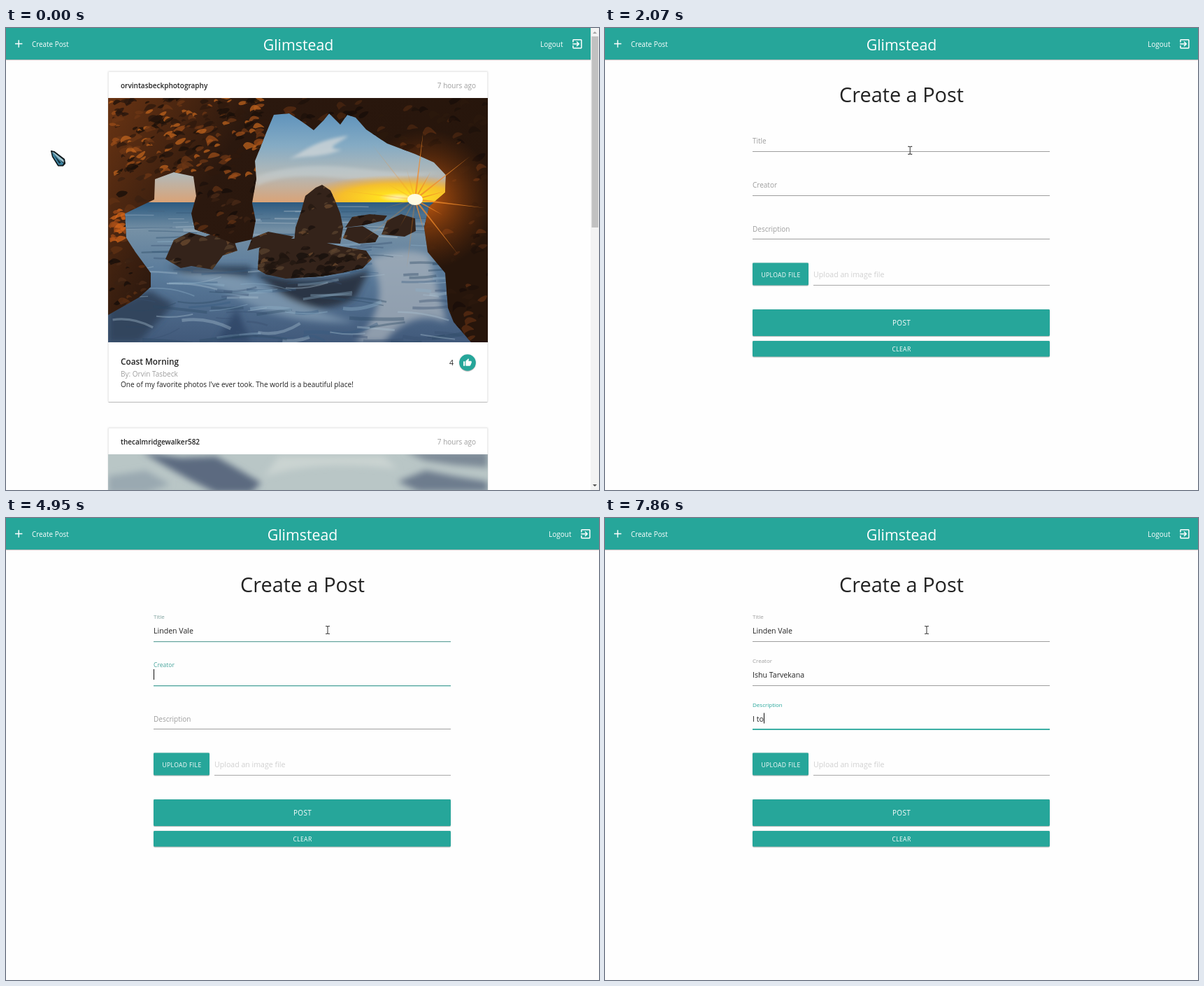
Recreate the animation shown at these times as an HTML page. Size 848x660 px, loop 7990 ms.

```html
<!DOCTYPE html>
<html lang="en">
<head>
<meta charset="utf-8">
<title>Photo feed</title>
<style>
html, body { margin: 0; width: 100%; height: 100%; overflow: hidden; background: #fefefe; }
svg { display: block; width: 848px; height: 660px; }
text { font: 10px "Open Sans", "Noto Sans", sans-serif; fill: #222; white-space: pre; }
.white { fill: #fff; }
.grey { fill: #9e9e9e; }
.bold { font-weight: 600; }
.teal { fill: #26a69a; }
.btn { letter-spacing: .35px; text-anchor: middle; fill: #fff; }
.small { font-size: 8.6px; }
.field { font-size: 10.6px; }
.lift { filter: drop-shadow(0 1.4px .7px rgba(0,0,0,.22)) drop-shadow(0 .5px 1px rgba(0,0,0,.14)); }
.light { fill: #9cc3cf; }
.mid { fill: #3f86a3; }
.deep { fill: #16303d; }
.link .light { fill: #e6edc4; }
.link .mid { fill: #4cbf52; }
.link .deep { fill: #1d7a33; }
</style>
</head>
<body>
<svg viewBox="0 0 848 660" id="stage">
  <defs>
    <linearGradient id="sky" x1="0" y1="0" x2="0" y2="1">
      <stop offset="0" stop-color="#4d88b8"/>
      <stop offset=".45" stop-color="#85abc4"/>
      <stop offset=".72" stop-color="#b3b9b8"/>
      <stop offset="1" stop-color="#dba274"/>
    </linearGradient>
    <linearGradient id="sea" x1="0" y1="0" x2="0" y2="1">
      <stop offset="0" stop-color="#2c5a80"/>
      <stop offset=".2" stop-color="#7590a5"/>
      <stop offset=".5" stop-color="#5a7b9b"/>
      <stop offset="1" stop-color="#41597a"/>
    </linearGradient>
    <radialGradient id="glow">
      <stop offset="0" stop-color="#fff8c0"/>
      <stop offset=".2" stop-color="#ffdf20"/>
      <stop offset=".6" stop-color="#fdc21a" stop-opacity=".85"/>
      <stop offset="1" stop-color="#f5a02c" stop-opacity="0"/>
    </radialGradient>
    <linearGradient id="stone" x1="0" y1="0" x2="1" y2=".35">
      <stop offset="0" stop-color="#6a3413"/>
      <stop offset=".35" stop-color="#2b180e"/>
      <stop offset="1" stop-color="#26150b"/>
    </linearGradient>
    <radialGradient id="flare" gradientUnits="userSpaceOnUse" cx="600" cy="245" r="100">
      <stop offset="0" stop-color="#e0660f" stop-opacity=".85"/>
      <stop offset="1" stop-color="#8a3c0c" stop-opacity="0"/>
    </radialGradient>
    <filter id="soft" x="-30%" y="-50%" width="160%" height="200%"><feGaussianBlur stdDeviation="5"/></filter>
    <filter id="haze" x="-10%" y="-20%" width="120%" height="140%"><feGaussianBlur stdDeviation="2"/></filter>
    <clipPath id="frame"><rect x="146" y="100" width="543" height="349"/></clipPath>
    <clipPath id="strip"><rect x="146" y="609" width="543" height="51"/></clipPath>
    <clipPath id="cliff"><path id="arch" d="M146 100H689V449H665L640 420 632 400 628 350 603 320 598 285 605 255 628 235 629 210 612 192 585 180 545 165 515 145 500 128 488 124 478 138 462 122 454 132 440 146 425 135 405 122 383 124 372 150 356 190 358 215 352 250 357 275 352 302 325 308 295 296 270 288 265 265 272 240 268 212 240 206 213 216 212 245 170 265 172 300 185 320 207 350 207 370 190 385 146 410Z"/></clipPath>
    <clipPath id="boulders"><path id="rocks" d="M412 305L414 285 422 262 428 240 443 228 452 224 464 232 470 245 478 265 482 285 478 308Z
      M360 345L362 315 375 303 400 300 440 303 480 312 515 318 523 330 510 343 480 350 450 355 400 358 372 352Z
      M228 330L240 303 262 292 285 298 300 292 325 300 331 318 310 325 295 345 265 340 250 343Z
      M482 300L488 285 510 283 533 297 528 306 505 308Z M537 295L545 275 565 266 585 272 586 290 570 298Z
      M485 285L495 270 520 266 545 268 540 275 510 282Z M345 318L352 300 375 291 412 298 400 306 368 312Z"/></clipPath>
  </defs>
  <rect width="848" height="660" fill="#fefefe"/>

  <g id="feed">
    <rect class="lift" x="146" y="62" width="543" height="472" rx="1.4" fill="#fff"/>
    <path d="M146.5 534V62.5H688.5V534" fill="none" stroke="#ececec"/>
    <text class="bold" x="164" y="86">orvintasbeckphotography</text>
    <text class="grey" x="672" y="86" text-anchor="end">7 hours ago</text>
    <g clip-path="url(#frame)">
      <rect x="146" y="100" width="543" height="151" fill="url(#sky)"/>
      <g fill="#cdd5d8" filter="url(#haze)">
        <path d="M405 187C425 178 440 160 490 154C470 168 455 172 480 174C450 186 425 182 405 187Z" opacity=".8"/>
        <path d="M358 212Q420 190 500 200T620 206Q540 222 470 214T358 226Z" opacity=".45"/>
      </g>
      <ellipse cx="560" cy="242" rx="135" ry="32" fill="url(#glow)"/>
      <rect x="146" y="249" width="543" height="200" fill="url(#sea)"/>
      <g filter="url(#soft)">
        <path d="M350 345Q430 375 520 345L500 385Q450 415 400 385Z" fill="#2c3644"/>
        <path d="M146 400L205 375 240 395 190 449H146Z" fill="#31445d"/>
        <path d="M230 340H350V355L260 352Z" fill="#33445a"/>
        <path d="M330 400L350 449H300Z" fill="#33496a"/>
        <path d="M520 330Q570 310 605 325L630 420Q580 400 540 449H500Q555 390 520 330Z" fill="#a9b2bd" opacity=".75"/>
        <path d="M215 360Q300 335 370 370T500 420Q400 425 330 385T215 360Z" fill="#93aabf" opacity=".6"/>
      </g>
      <g id="waves"></g>
      <use href="#rocks" fill="#34231a"/>
      <g id="facets" clip-path="url(#boulders)"></g>
      <use href="#arch" fill="url(#stone)"/>
      <g id="grain" clip-path="url(#cliff)"></g>
      <use href="#arch" fill="url(#flare)"/>
      <g id="rays" fill="#f08a2a"></g>
      <ellipse cx="585" cy="245" rx="11" ry="8" fill="#fffbe0"/>
    </g>
    <text class="bold" x="164" y="481" style="font-size:11.8px">Coast Morning</text>
    <text class="grey" x="164" y="498">By: Orvin Tasbeck</text>
    <text x="164" y="513" style="font-size:10.08px">One of my favorite photos I've ever took. The world is a beautiful place!</text>
    <text x="634" y="482" style="font-size:10.6px">4</text>
    <circle class="teal lift" cx="660" cy="478" r="11.8"/>
    <path class="white" transform="translate(653.6 471.6) scale(.53)" d="M1 21h4V9H1v12zm22-11c0-1.1-.9-2-2-2h-6.31l.95-4.57.03-.32c0-.41-.17-.79-.44-1.06L14.17 1 7.59 7.59C7.22 7.95 7 8.45 7 9v10c0 1.1.9 2 2 2h9c.83 0 1.54-.5 1.84-1.22l3.02-7.05c.09-.23.14-.47.14-.73v-2z"/>

    <rect class="lift" x="146" y="571" width="543" height="100" rx="1.4" fill="#fff"/>
    <path d="M146.5 660V571.5H688.5V660" fill="none" stroke="#ececec"/>
    <text class="bold" x="164" y="595">thecalmridgewalker582</text>
    <text class="grey" x="672" y="595" text-anchor="end">7 hours ago</text>
    <g clip-path="url(#strip)">
      <rect x="146" y="609" width="543" height="51" fill="#b9c6c6"/>
      <g filter="url(#soft)" fill="#5b6a80">
        <path d="M195 606L250 614 300 612 335 632 365 650 350 664H300L262 645 232 628Z"/>
        <path d="M560 648L600 632 640 640 689 648V662H590Z" fill="#6d7b8d"/>
        <path d="M570 605H689V628L640 624 600 618Z" fill="#7c8996"/>
        <path d="M370 640Q450 615 560 630L540 612H390Z" fill="#cbd4d2"/>
        <path d="M146 640L200 632 235 652 200 664H146Z" fill="#9aa9b1"/>
      </g>
    </g>
    <rect x="836" width="12" height="660" fill="#f3f3f3"/>
    <rect x="837.5" y="12" width="9.5" height="273" fill="#c1c1c1"/>
    <path d="M839 8L842 5 845 8Z" fill="#a3a3a3"/>
    <path d="M839 652L842 655 845 652Z" fill="#505050"/>
  </g>

  <g id="form">
    <text x="424" y="106" text-anchor="middle" style="font-size:28.9px">Create a Post</text>
    <g id="fields"></g>
    <rect class="teal lift" x="211" y="335.5" width="80" height="32" rx="1.4"/>
    <text class="btn small" x="251.5" y="355.5">UPLOAD FILE</text>
    <text class="field" x="298" y="356" style="fill:#d0d0d0">Upload an image file</text>
    <rect x="298" y="367" width="338" height="1" fill="#a8a8a8"/>
    <rect class="teal lift" x="211" y="402" width="425" height="38" rx="1.4"/>
    <text class="btn" x="424" y="425">POST</text>
    <rect class="teal lift" x="211" y="447" width="425" height="22.5" rx="1.4"/>
    <text class="btn small" x="424" y="462">CLEAR</text>
  </g>

  <rect id="bar" class="teal lift" width="848" height="45"/>
  <rect id="hover" width="101" height="45"/>
  <path d="M13 22.5H23.4M18.2 17.3V27.7" stroke="#fff" stroke-width="1.4"/>
  <text class="white" x="37" y="27" style="font-size:9.9px">Create Post</text>
  <text class="white" id="brand" y="32" text-anchor="middle" style="font-size:21.3px">Glimstead</text>
  <g id="logout">
    <text class="white" x="764" y="27">Logout</text>
    <path class="white" transform="translate(807.9 13.8) scale(.75)" d="M10.09 15.59L11.5 17l5-5-5-5-1.41 1.41L12.67 11H3v2h9.67l-2.58 2.59zM19 3H5c-1.11 0-2 .9-2 2v4h2V5h14v14H5v-4H3v4c0 1.1.89 2 2 2h14c1.1 0 2-.9 2-2V5c0-1.1-.9-2-2-2z"/>
  </g>

  <g id="status">
    <path d="M0 660V645.5H75.5Q78.5 645.5 78.5 648.5V660Z" fill="#38383c"/>
    <text x="3" y="656" style="font-size:8.1px;fill:#d8d8dc">localhost:3000/add</text>
  </g>

  <g id="arrow" stroke-linejoin="round">
    <path d="M.6 .6L5 1.6 19.5 12.5 20.5 18.5 17.5 21.8 10.5 21.8 2.5 9Z" fill="#0c1519" stroke="#0c1519" stroke-width="1.2"/>
    <path class="mid" d="M1.6 2L18.4 18.6 16.8 20.6 11.2 20.8 3.4 8.4Z"/>
    <path class="light" d="M1.6 1.8L5 3 18.4 13.4 19 17.6 12 12.4Z"/>
    <path class="deep" d="M5.2 7L14.8 17.6 12 18.8Z"/>
  </g>
  <path id="beam" d="M-3-5.5H-1L0-4.5 1-5.5H3M-3 5.5H-1L0 4.5 1 5.5H3M0-4.5V4.5" fill="none" stroke="#444" stroke-width="1.1"/>
</svg>
<script>
const LOOP = 7990, SWITCH = 1410, LEFT = 211;
const $ = id => document.getElementById(id);
const clamp = v => Math.max(0, Math.min(1, v));
const ramp = (t, from, to) => clamp((t - from) / (to - from));
const easeOut = p => 1 - (1 - p) ** 2;
const easeBoth = p => p * p * (3 - 2 * p);
const mix = (a, b, p) => a + (b - a) * p;
const blend = (a, b, p) => `rgb(${a.map((v, i) => Math.round(mix(v, b[i], p)))})`;
const set = (el, attrs) => { for (const k in attrs) el.setAttribute(k, attrs[k]); };
const show = (el, on) => { el.style.display = on ? '' : 'none'; };
function add(parent, tag, attrs) {
  const el = document.createElementNS('http://www.w3.org/2000/svg', tag);
  set(el, attrs);
  return parent.appendChild(el);
}

// Photo texture
let seed = 11;
const rnd = (a = 0, b = 1) => {
  seed = (seed * 1664525 + 1013904223) % 4294967296;
  return mix(a, b, seed / 4294967296);
};
const pick = list => list[Math.floor(rnd(0, list.length))];
function chips(id, n, [x0, y0, x1, y1], size, colors) {
  for (let i = 0; i < n; i++) {
    const x = rnd(x0, x1), y = rnd(y0, y1), s = rnd(size / 3, size);
    const d = `M${x} ${y}q${s * .3} ${-s * rnd(.4, 1)} ${s} ${-s * rnd(.2, .8)}t${s * rnd(0, .4)} ${s * .4}t${-s} ${s * rnd(.1, .6)}Z`;
    add($(id), 'path', { d, fill: pick(colors), opacity: .75 });
  }
}
function waves(n, y0, y1, long, colors) {
  for (let i = 0; i < n; i++) {
    const y = rnd(y0, y1), near = (y - 250) / 200, w = rnd(long / 4, long), bend = w * .12 * near;
    add($('waves'), 'path', {
      d: `M${rnd(140, 670)} ${y}q${w / 2} ${rnd(-bend, bend)} ${w} ${rnd(-bend, bend) * 2}`,
      fill: 'none', stroke: pick(colors), 'stroke-width': rnd(1, 2 + 4 * near), opacity: .38
    });
  }
}
waves(70, 255, 300, 90, ['#2a4c6c', '#c3ced6', '#9fb4c4', '#466580']);
waves(130, 300, 449, 80, ['#8fb0c9', '#2c4763', '#a9bfd0', '#35597f', '#39506e']);
chips('facets', 170, [225, 225, 585, 350], 11, ['#57402c', '#6b4a2e', '#1a110c', '#241811']);
chips('facets', 50, [360, 325, 525, 358], 15, ['#17100c', '#21160f']);
chips('grain', 230, [146, 100, 365, 215], 13, ['#9a4d18', '#bd621c', '#6b3615', '#1a0f09', '#24150d', '#2e190d']);
chips('grain', 170, [146, 215, 365, 410], 12, ['#5f3013', '#3a2012', '#150c08', '#1d110b', '#4a2a17']);
chips('grain', 230, [365, 100, 689, 449], 14, ['#4a2611', '#5a2d12', '#170d08', '#1d110a', '#2b180d']);
chips('grain', 26, [146, 260, 168, 305], 12, ['#d2641a', '#a44d17']);
for (let i = 0; i < 16; i++) {
  const a = i * Math.PI / 8 + .12, r = i % 2 ? 45 : 100, c = Math.cos(a), s = Math.sin(a);
  add($('rays'), 'path', {
    d: `M${585 - s * 1.4} ${245 + c * 1.4}L${585 + r * c} ${245 + r * s}L${585 + s * 1.4} ${245 - c * 1.4}Z`,
    opacity: c > 0 ? .75 : .25
  });
}

// Form fields
const GREY = [158, 158, 158], TEAL = [38, 166, 154];
const fields = [
  { name: 'Title', value: 'Linden Vale', y: 165, line: 176, focus: 2305, blur: 4855,
    keys: [3100, 3370, 3430, 3490, 3690, 3850, 3950, 4210, 4410, 4505, 4600] },
  { name: 'Creator', value: 'Ishu Tarvekana', y: 228, line: 239, focus: 4855, blur: 7190,
    keys: [5160, 5320, 5420, 5610, 5740, 6000, 6150, 6320, 6520, 6616, 6712, 6808, 6904, 7000] },
  { name: 'Description', value: 'I to', y: 290.5, line: 301, focus: 7190, blur: LOOP,
    keys: [7480, 7670, 7765, 7860] }
];
for (const f of fields) {
  const g = $('fields');
  f.rule = add(g, 'rect', { x: LEFT, y: f.line, width: 425, height: 1 });
  f.glow = add(g, 'rect', { x: LEFT, y: f.line + 1, width: 425, height: .8, class: 'teal' });
  f.label = add(g, 'text', { x: LEFT });
  f.label.textContent = f.name;
  f.text = add(g, 'text', { x: LEFT, y: f.y, class: 'field' });
  f.caret = add(g, 'rect', { y: f.y - 12, width: 1, height: 15, fill: '#111' });
}

function drawField(f, t) {
  const up = easeOut(ramp(t, f.focus, f.focus + 200));
  const tint = up * (1 - easeOut(ramp(t, f.blur, f.blur + 200)));
  const edge = easeOut(ramp(t, f.focus, f.focus + 250)) * (1 - easeOut(ramp(t, f.blur, f.blur + 300)));
  set(f.label, { y: f.y - 21 * up });
  f.label.style.fontSize = mix(10, 8, up) + 'px';
  f.label.style.fill = blend(GREY, TEAL, tint);
  set(f.rule, { fill: blend(GREY, TEAL, edge) });
  set(f.glow, { opacity: edge * edge });
  const count = f.keys.filter(k => t >= k).length;
  f.text.textContent = f.value.slice(0, count);
  const last = count ? f.keys[count - 1] : f.focus;
  const active = t >= f.focus && t < f.blur;
  show(f.caret, active && (t - last) % 1060 < 530);
  set(f.caret, { x: Math.round(LEFT + (count ? f.text.getComputedTextLength() : 0)) });
}

function pointer(t) {
  if (t < 1480) {
    const p = easeBoth(ramp(t, 640, 1180));
    return [mix(64, 50, p), mix(175, 28, p)];
  }
  if (t < 2070) {
    const p = easeBoth(ramp(t, 1460, 2110)) / easeBoth(ramp(2070, 1460, 2110));
    return [mix(50, 436, p), mix(28, 175, p)];
  }
  const p = easeOut(ramp(t, 2070, 2260));
  return [mix(436, 460, p), mix(175, 160, p)];
}

function draw(t) {
  const onForm = t >= SWITCH;
  show($('feed'), !onForm);
  show($('form'), onForm);
  set($('bar'), { width: onForm ? 848 : 836 });
  set($('brand'), { x: onForm ? 424 : 418 });
  set($('logout'), { transform: `translate(${onForm ? 12 : 0})` });
  set($('hover'), { opacity: onForm ? 0 : .11 * ramp(t, 1020, 1300) });
  set($('status'), { opacity: ramp(t, 1285, 1410) * (1 - ramp(t, 1600, 1780)) });

  const [x, y] = pointer(t);
  const typing = onForm && y > 145;
  const place = `translate(${x.toFixed(2)} ${y.toFixed(2)})`;
  show($('arrow'), !typing);
  show($('beam'), typing);
  set($('arrow'), { transform: place, class: y < 45 ? 'link' : '' });
  set($('beam'), { transform: place });
  if (onForm) fields.forEach(f => drawField(f, t));
}

const start = performance.now();
function tick() {
  draw((performance.now() - start) % LOOP);
  requestAnimationFrame(tick);
}
tick();
</script>
</body>
</html>
```
